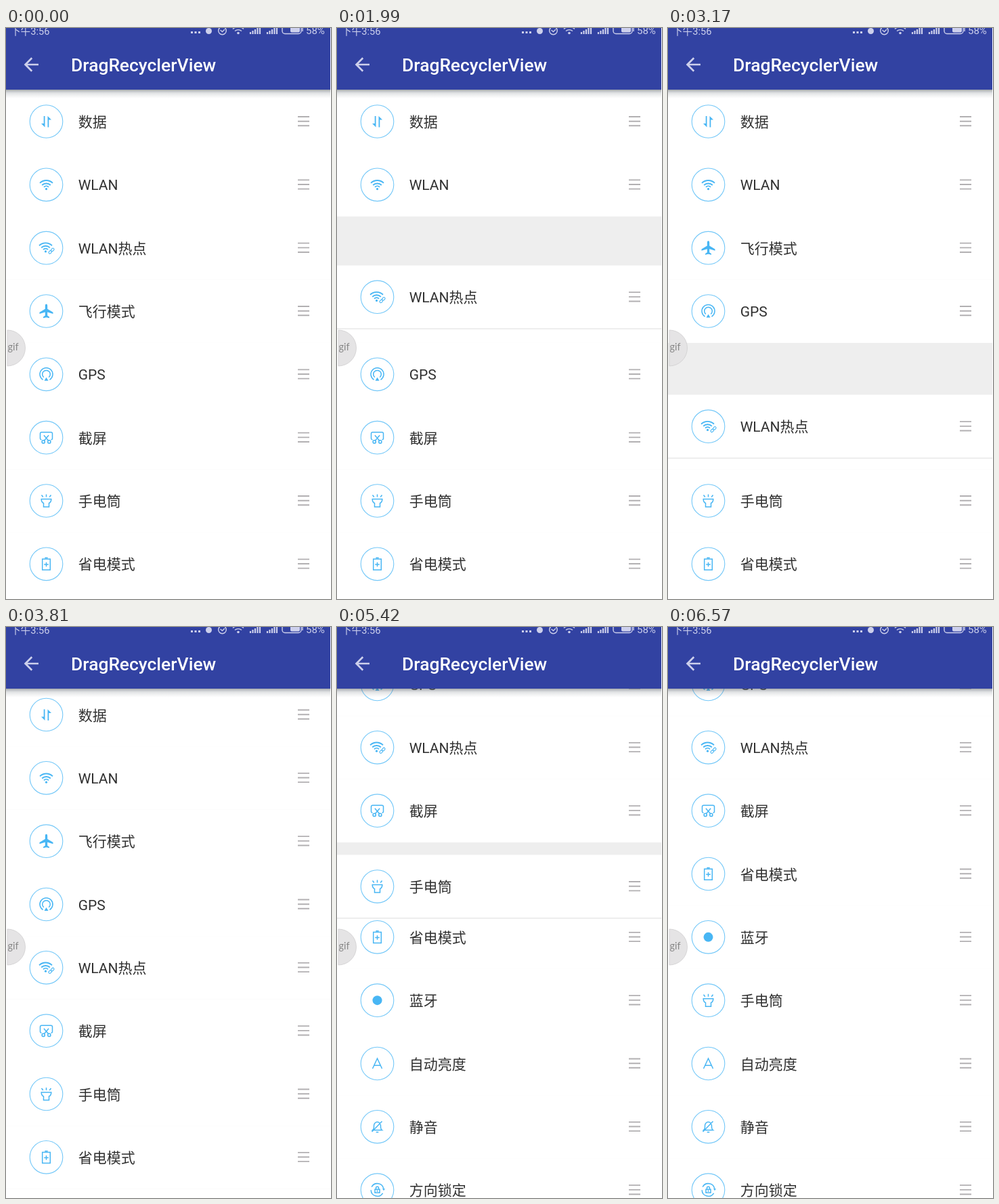
These frames come from a looping animation (480x843 px, 6.93 s). An HTML page:

```html
<!DOCTYPE html>
<html lang="zh-CN">
<head>
<meta charset="utf-8">
<title>DragRecyclerView</title>
<style>
html, body { margin: 0; width: 100%; height: 100%; overflow: hidden; background: #fff; }
svg { display: block; }
text { font-family: Roboto, "Noto Sans CJK SC", "Noto Sans CJK", "Noto Sans CJK JP", sans-serif; }
.label { font-size: 21px; fill: #303030; }
.ring { fill: none; stroke: #74c8f8; stroke-width: 1.1; }
.handle { stroke: #b2b0b2; stroke-width: 1.9; }
.icon { fill: none; stroke: #48b6f4; stroke-width: 1.5; }
.icon .solid { fill: #48b6f4; stroke: none; }
.status { fill: none; stroke: #cdd0ec; stroke-width: 1.4; }
.status .solid, .status text { fill: #cdd0ec; stroke: none; }
</style>
</head>
<body>
<svg width="480" height="843" viewBox="0 0 480 843">
  <defs>
    <linearGradient id="shade" x2="0" y2="1">
      <stop offset="0" stop-color="#4c545c" stop-opacity=".5"/>
      <stop offset=".4" stop-color="#6c747c" stop-opacity=".2"/>
      <stop offset="1" stop-color="#8c949c" stop-opacity="0"/>
    </linearGradient>
  </defs>
  <rect width="480" height="843" fill="#eee"/>
  <g id="list"></g>

  <rect y="91" width="480" height="13" fill="url(#shade)"/>
  <rect width="480" height="91" fill="#3242a2"/>
  <path transform="translate(21.3 38) scale(1.3333)" fill="#cdd0ec"
    d="M20 11H7.83l5.59-5.59L12 4l-8 8 8 8 1.41-1.41L7.83 13H20z"/>
  <text x="96" y="64" font-size="26.4" font-weight="500" fill="#fff">DragRecyclerView</text>

  <g class="status">
    <text x="7" y="9.5" font-size="14.6">下午3:56</text>
    <text x="443" y="9" font-size="15">58%</text>
    <path class="solid" d="M273 5h3v3h-3zM278.5 5h3v3h-3zM284 5h3v3h-3z"/>
    <circle class="solid" cx="299.5" cy="4.5" r="4.5"/>
    <circle cx="319.5" cy="4" r="5.8"/>
    <path d="M316.5 3l3 2.5 3.5-3.5"/>
    <path d="M335 1.5a12 12 0 0 1 16 0M338 4.5a8 8 0 0 1 10 0"/>
    <circle class="solid" cx="343" cy="7.5" r="1.8"/>
    <path id="bars" stroke-width="2.2"/>
    <rect x="408" y="-4" width="28" height="12.5" rx="4"/>
    <rect class="solid" x="420" y="-2" width="14" height="8.5" rx="2"/>
    <path d="M438 0v5"/>
  </g>

  <path d="M2 446a26.5 26.5 0 0 1 0 53z" fill="#e5e4e5" stroke="#d0cfd0" stroke-width=".8"/>
  <text x="2.5" y="476" font-size="14.5" fill="#888" style="font-family:Lato,sans-serif">gif</text>
  <rect x="479" width="1" height="843" fill="#fff"/>
</svg>
<script>
const LOOP = 6930, PITCH = 280 / 3, FIRST = 138;
const MOVE = 250, SLOP = 4.5, FRAME = 96;

const dot = (x, y, r) => `<circle class="solid" cx="${x}" cy="${y}" r="${r}"/>`;
const ring = (x, y, r) => `<circle cx="${x}" cy="${y}" r="${r}"/>`;
const line = d => `<path d="${d}"/>`;
const solid = d => `<path class="solid" d="${d}"/>`;
const arc = r => `M${-r * .7} ${7 - r * .7}a${r} ${r} 0 0 1 ${r * 1.4} 0`;
const wifi = `<path stroke-width="1.9" d="${[5, 9, 13.5].map(arc).join('')}"/>` + dot(0, 6.3, 1.6);
const link = x => `<rect x="${x}" y="-1.7" width="5" height="3.4" rx="1.7" fill="#fff"/>`;

const rows = [
  ['数据', solid('M-3.8 -8h1.8v16.5l-5.5-5.5h3.7zM3.8 8.5h-1.8v-16.5l5.5 5.5h-3.7z')],
  ['WLAN', wifi],
  ['WLAN热点', `<g transform="translate(-1 -1)">${wifi}</g>` +
    `<g transform="translate(7.5 4.5) rotate(-45)" stroke-width="1.1">${link(-5) + link(0)}</g>`],
  ['飞行模式', solid('M0 -10.5q1.7 0 1.7 3v4.3l8.3 5v2.2l-8.3-2.5v5l2.8 2v1.7l-4.5-1-4.5 1v-1.7l2.8-2v-5l-8.3 2.5v-2.2l8.3-5v-4.3q0-3 1.7-3z')],
  ['GPS', line('M-5 8a9.5 9.5 0 1 1 10 0M-3.7 4.4a5.8 5.8 0 1 1 7.4 0') + solid('M0 4.5l3 5h-6z')],
  ['截屏', line('M-7 3h-.3q-1.7 0-1.7-1.7v-7.1q0-2.2 2.2-2.2h13.6q2.2 0 2.2 2.2v7.1q0 1.7-1.7 1.7h-.3M-3.6 -3.5l6.8 8M3.6 -3.5l-6.8 8') +
    ring(-4.3, 6.3, 2.1) + ring(4.3, 6.3, 2.1)],
  ['手电筒', line('M0 -9.5v4M-7 -8.5l2.3 3M7 -8.5l-2.3 3M-7.3 -2.5h14.6q0 4.5-3.3 6v5.5h-8v-5.5q-3.3-1.5-3.3-6z')],
  ['省电模式', line('M-5.8 -7.3h11.6v16h-11.6zM-2.2 -9h4.4M-3.3 .7h6.6M0 -2.6v6.6')],
  ['蓝牙', dot(0, 0, 7)],
  ['自动亮度', line('M-7 7.5l7-15 7 15M-4.6 2.8h9.2')],
  ['静音', line('M-7 5q2-1.5 2-4v-2.5a5 5.5 0 0 1 10 0v2.5q0 2.5 2 4zM-1.8 8h3.6M-8 7.5l15-15.5')],
  ['方向锁定', line('M9.3 -1.5a9.4 9.4 0 0 0-17.6-3M-9.3 0a9.4 9.4 0 0 0 17.4 4.7M-2 -1v-1.8a2 2 0 0 1 4 0v1.8M-3.5 -1h7v5h-7z') +
    solid('M7.5 -2h4l-2 3z') + dot(0, 1.5, 1.1)]
];

// Each burst redraws at a steady rate, keeps its last pose, then settles at rest.
const bursts = [
  { from: 1640, to: 3340, rest: 3540 },
  { from: 3810, to: 4200, rest: 4400 },
  { from: 5420, to: 6390, rest: 6570 }
];

// The finger moves at one speed up to its reach, then lets go.
const drags = [
  { row: 2, lift: 1250, start: 1647, speed: .1955, reach: 263.5, drop: 3158 },
  { row: 6, lift: 5420, start: 5373, speed: .395, reach: 275, drop: 6227 }
];

const ease = (t, start, span = MOVE) =>
  .5 - .5 * Math.cos(Math.PI * Math.min(1, Math.max(0, (t - start) / span)));

const scrolled = t => 333.5 * ease(t, 3761, 480);

function hold(t) {
  const b = bursts.filter(b => b.from <= t).pop();
  if (!b) return 0;
  if (t >= b.rest) return b.rest;
  const count = Math.round((b.to - b.from) / FRAME);
  const step = (b.to - b.from) / count;
  return b.from + step * Math.min(count, Math.floor((t - b.from) / step + .3));
}

const list = document.getElementById('list');
const nodes = rows.map(([name, icon]) => {
  const g = document.createElementNS('http://www.w3.org/2000/svg', 'g');
  g.innerHTML = `<rect y="${-PITCH / 2}" width="480" height="${PITCH + .2}" fill="#fff"/>
    <path class="edge" d="M0 ${PITCH / 2 + .2}h480" stroke="#c6c6c6" opacity="0"/>
    <circle class="ring" cx="59.5" r="24.3"/>
    <g class="icon" transform="translate(59.5 0)">${icon}</g>
    <text class="label" x="106.67" y="8">${name}</text>
    <path class="handle" d="M431 -7h17M431 -.3h17M431 6.3h17"/>`;
  return list.appendChild(g);
});
const edges = nodes.map(g => g.querySelector('.edge'));
drags.forEach(d => list.appendChild(nodes[d.row]));

document.getElementById('bars').setAttribute('d',
  [360, 385].map(x => [0, 1, 2, 3, 4].map(i => `M${x + 1 + i * 3.5} 9V${6 - i * 2}`).join('')).join(''));

function draw(now) {
  const t = hold(now);
  const y = rows.map((_, i) => FIRST + PITCH * i - scrolled(t));
  for (const d of drags) {
    const pull = Math.min(d.reach, Math.max(0, (t - d.start) * d.speed));
    const passed = Math.floor((d.reach - SLOP) / PITCH);
    y[d.row] += pull + (PITCH * passed - pull) * ease(t, d.drop);
    // A neighbour moves up once the dragged row is clear of it.
    for (let k = 1; k <= passed; k++)
      y[d.row + k] -= PITCH * ease(t, d.start + (PITCH * k + SLOP) / d.speed);
    edges[d.row].setAttribute('opacity', now >= d.lift && t < d.drop ? .6 : 0);
  }
  nodes.forEach((g, i) => g.setAttribute('transform', `translate(0 ${y[i].toFixed(2)})`));
}

const began = performance.now();
function frame() {
  draw((performance.now() - began) % LOOP);
  requestAnimationFrame(frame);
}
frame();
</script>
</body>
</html>
```
